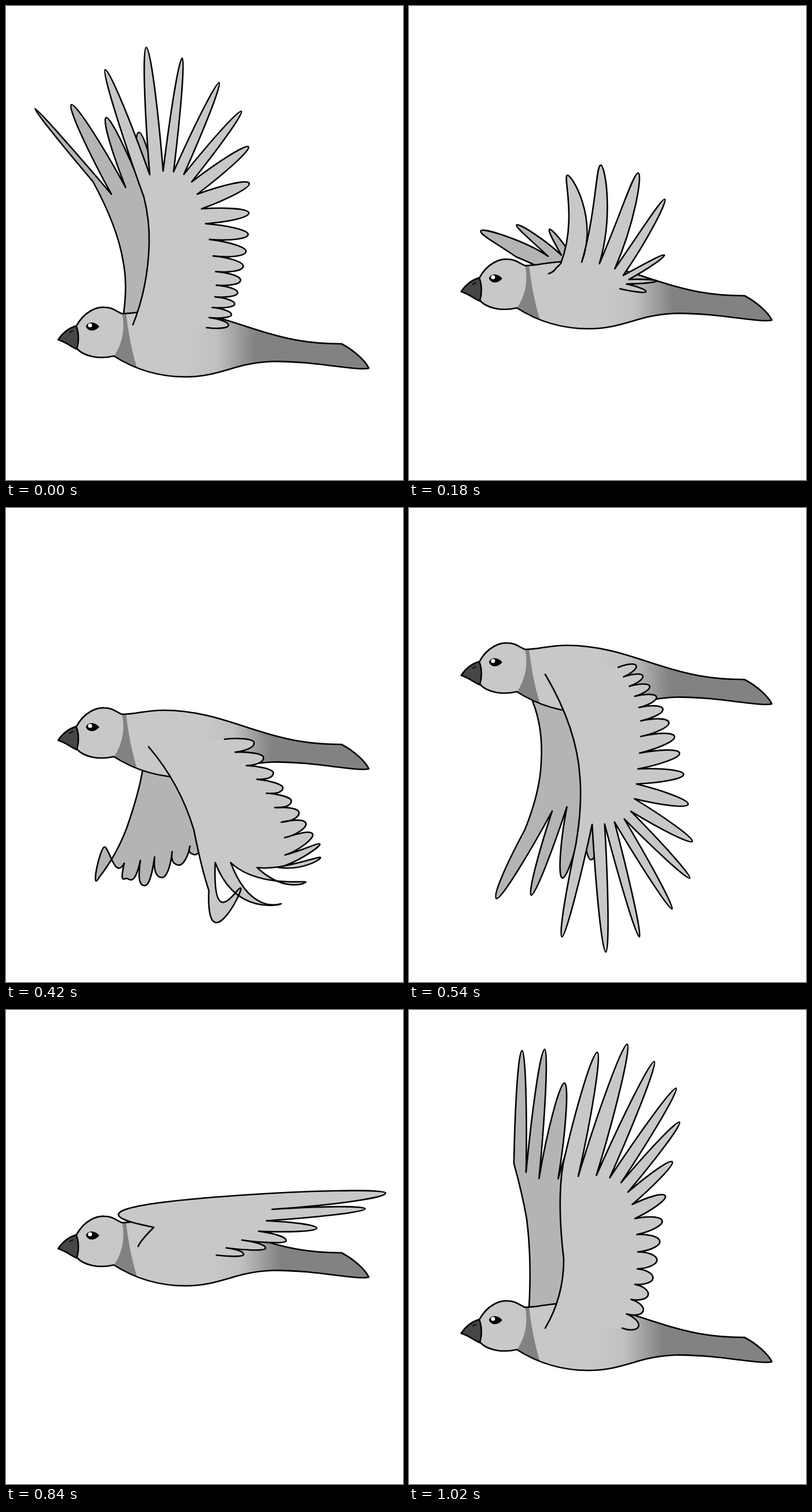
Animation of 685 by 818 pixels, one loop 1080 ms. Source, as an HTML page with a canvas:

```html
<!DOCTYPE html>
<html lang="en">
<head>
<meta charset="utf-8">
<title>Flying bird</title>
<style>
html, body { margin: 0; width: 100%; height: 100%; overflow: hidden; background: #fff; }
canvas { display: block; }
</style>
</head>
<body>
<canvas id="stage" width="685" height="818"></canvas>
<script>
const ctx = document.getElementById('stage').getContext('2d');
const LOOP = 1080, STEP = 60;

// A wing is a feather count, the bend of its first feather, an arm (root to wrist),
// and key points of two curves: one through the feather tips, one through the notches.
const wing = (count, bend, arm, tips, notches) => [count, ...bend, ...arm, ...tips, ...notches];

// body: height offset and place of the tail shading
const poses = [
  { t: 0, body: [0, 400],
    near: wing(16, [0, 0], [219,550, 245,485, 247,410, 248,370, 238,330],
      [171,110, 261,73, 401,171, 419,356, 406,467, 384,551],
      [248,291, 277,285, 318,300, 344,375, 363,476, 346,555]),
    far: wing(4, [0, 0], [203,530, 210,480, 202,440, 192,380, 150,303],
      [50,177, 116,171, 229,218], [182,325, 208,313, 262,320]) },

  { t: 180, body: [-83, 425],
    near: wing(7, [32, 0], [241,462, 250,459, 254,452, 259,448, 262,444],
      [273,292, 302,276, 363,280, 437,318, 438,450, 409,493],
      [298,442, 312,443, 345,448, 367,463, 380,474, 364,488]),
    far: wing(4, [6, -4], [235,465, 225,452, 215,446, 200,439, 185,433],
      [124,388, 189,378, 295,395], [240,432, 264,430, 300,440]) },

  { t: 420, body: [-175, 428],
    near: wing(13, [-30, 115], [246,412, 300,475, 324,555, 338,625, 350,660],
      [405,656, 478,682, 543,602, 522,552, 484,493, 428,405],
      [361,612, 390,612, 471,620, 478,553, 440,478, 377,399]),
    far: wing(6, [-10, 50], [236,450, 230,490, 208,553, 190,600, 161,637],
      [170,585, 232,652, 324,598], [204,613, 250,604, 345,575]) },

  { t: 540, body: [-287, 420],
    near: wing(16, [0, 0], [235,287, 290,380, 295,465, 299,515, 288,580],
      [264,740, 358,762, 481,650, 474,461, 441,353, 392,272],
      [316,546, 343,544, 381,527, 395,451, 398,350, 361,275]),
    far: wing(4, [0, 0], [213,333, 232,380, 228,440, 226,490, 200,555],
      [151,674, 214,667, 314,607], [247,523, 274,516, 330,540]) },

  { t: 720, body: [-280, 412],
    near: wing(9, [0, 0], [230,290, 218,308, 281,345, 85,378, 310,458],
      [513,492, 531,472, 536,434, 445,385, 431,342, 398,290],
      [381,446, 386,435, 383,404, 381,368, 386,322, 369,283]),
    far: wing(4, [0, 0], [208,338, 200,358, 165,390, 120,418, 190,435],
      [330,459, 335,450, 340,440], [330,450, 330,445, 330,440]) },

  { t: 840, body: [-164, 443],
    near: wing(6, [0, 0], [228,408, 232,398, 255,375, 82,342, 400,320],
      [655,316, 645,328, 603,351, 512,386, 464,406, 410,422],
      [459,344, 455,352, 446,369, 429,387, 389,405, 363,423]),
    far: wing(4, [0, 0], [240,365, 236,360, 230,354, 245,352, 260,352],
      [400,340, 395,345, 390,350], [395,350, 390,352, 380,355]) },

  { t: 1020, body: [-18, 408],
    near: wing(14, [0, 0], [235,549, 267,495, 267,430, 255,330, 266,265],
      [325,73, 383,62, 466,150, 442,323, 426,441, 396,546],
      [292,287, 327,286, 370,302, 390,361, 393,455, 368,549]),
    far: wing(4, [0, 0], [207,515, 212,430, 203,360, 195,315, 181,265],
      [195,70, 236,70, 300,190], [202,280, 226,291, 290,290]) }
];

const hermite = (p, q, m0, m1, s) =>
  p + (q - p) * s * s * (3 - 2 * s) + m0 * s * (1 - s) ** 2 - m1 * s * s * (1 - s);

function poseAt(i) {
  const n = poses.length, pose = poses[(i + n) % n];
  return { ...pose, t: pose.t + LOOP * Math.floor(i / n) };
}

// Smooth cyclic interpolation through the key poses.
function sample(key, time) {
  const i = poses.findLastIndex(p => p.t <= time);
  const [a, b, c, d] = [-1, 0, 1, 2].map(k => poseAt(i + k));
  const h0 = b.t - a.t, h = c.t - b.t, h2 = d.t - c.t;
  return b[key].map((v, k) => {
    const w = c[key][k];
    const s0 = (v - a[key][k]) / h0, s1 = (w - v) / h, s2 = (d[key][k] - w) / h2;
    const m0 = (s0 * h + s1 * h0) / (h0 + h) * h;
    const m1 = (s1 * h2 + s2 * h) / (h + h2) * h;
    return hermite(v, w, m0, m1, (time - b.t) / h);
  });
}

// Point on a spline whose key points crowd towards the wing tip; u runs from 0 to 1.
function along(flat, u) {
  const last = flat.length / 2 - 1;
  const s = u ** (2 / 3) * last, i = Math.min(Math.floor(s), last - 1);
  return [0, 1].map(axis => {
    const at = k => flat[2 * k + axis];
    const p = at(i), q = at(i + 1);
    const m0 = i > 0 ? (q - at(i - 1)) / 2 : q - p;
    const m1 = i + 2 <= last ? (at(i + 2) - p) / 2 : q - p;
    return hermite(p, q, m0, m1, s - i);
  });
}

function addFeather(path, [ax, ay], [tx, ty], [bx, by], ox, oy) {
  const lx = tx - (ax + bx) / 2, ly = ty - (ay + by) / 2;
  const dx = lx - ox, dy = ly - oy, length = Math.hypot(dx, dy) || 1;
  const base = (dx * (by - ay) - dy * (bx - ax)) / length;
  const round = Math.max(-8, Math.min(8, base * 0.3)) / length;
  const ux = -dy * round, uy = dx * round;
  const cx = lx / 2 + ox, cy = ly / 2 + oy;
  path.bezierCurveTo(ax + cx, ay + cy, tx - ux, ty - uy, tx, ty);
  path.bezierCurveTo(tx + ux, ty + uy, bx + cx, by + cy, bx, by);
}

// The outline stays open at the shoulder; the fill closes through the back point.
function drawWing(values, fill, backX, backY) {
  const [count, ox, oy, ...points] = values;
  const arm = points.slice(0, 10), half = (points.length - 10) / 2;
  const tips = points.slice(10, 10 + half), notches = points.slice(10 + half);
  const outline = new Path2D();
  outline.moveTo(arm[0], arm[1]);
  outline.quadraticCurveTo(...arm.slice(2, 6));
  outline.quadraticCurveTo(...arm.slice(6));
  let notch = arm.slice(8);
  const n = Math.max(3, Math.round(count));
  for (let i = 0; i < n; i++) {
    const u = i / (n - 1), next = along(notches, u), bend = 0.5 ** i;
    addFeather(outline, notch, along(tips, u), next, ox * bend, oy * bend);
    notch = next;
  }
  const shape = new Path2D(outline);
  shape.lineTo(backX, backY);
  ctx.fillStyle = fill;
  ctx.fill(shape);
  ctx.stroke(outline);
}

const torso = new Path2D(`M186 604C160 610 135 605 122 591L121 553C135 526 158 519 170 520
  C184 520 190 527 200 531C225 531 240 524 272 524C335 524 385 544 430 558
  C480 574 520 583 579 583C600 594 620 612 626 625C615 629 570 621 520 616
  C470 612 445 612 410 620C375 629 350 640 310 640C262 640 222 627 186 604Z`);
const collar = new Path2D('M200 529Q209 570 186 605L226 625Q212 578 207 529Z');
const beak = new Path2D('M90 576C97 565 108 556 121 552C126 563 126 580 122 592C112 588 102 579 90 576Z');
const eye = new Path2D('M138 553C140 545 152 543 161 553C153 563 141 562 138 553Z');
const nostril = new Path2D('M110 564Q112 561 116 561');

function drawBody([y, shadeX]) {
  ctx.save();
  ctx.translate(0, y);
  const shade = ctx.createLinearGradient(shadeX - 90, 0, shadeX + 30, 0);
  shade.addColorStop(0, '#c8c8c8');
  shade.addColorStop(0.45, '#c0c0c0');
  shade.addColorStop(1, '#828282');
  ctx.fillStyle = shade;
  ctx.fill(torso);
  ctx.save();
  ctx.clip(torso);
  ctx.fillStyle = '#828282';
  ctx.fill(collar);
  ctx.restore();
  ctx.stroke(torso);
  ctx.fillStyle = '#464646';
  ctx.fill(beak);
  ctx.stroke(beak);
  ctx.lineWidth = 1.5;
  ctx.stroke(nostril);
  ctx.fillStyle = '#000';
  ctx.fill(eye);
  ctx.fillStyle = '#fff';
  ctx.beginPath();
  ctx.arc(145, 551, 3.5, 0, 7);
  ctx.fill();
  ctx.restore();
}

function draw(now) {
  const time = Math.floor(now % LOOP / STEP) * STEP;
  const near = sample('near', time), [rootX, rootY] = near.slice(3);
  ctx.fillStyle = '#fff';
  ctx.fillRect(0, 0, 685, 818);
  ctx.strokeStyle = '#000';
  ctx.lineWidth = 2.6;
  ctx.lineJoin = ctx.lineCap = 'round';
  drawWing(sample('far', time), '#b4b4b4', rootX + 45, rootY);
  drawBody(sample('body', time));
  drawWing(near, '#c8c8c8', rootX, rootY);
}

const start = performance.now();
function tick() {
  draw(performance.now() - start);
  requestAnimationFrame(tick);
}
tick();
</script>
</body>
</html>
```
